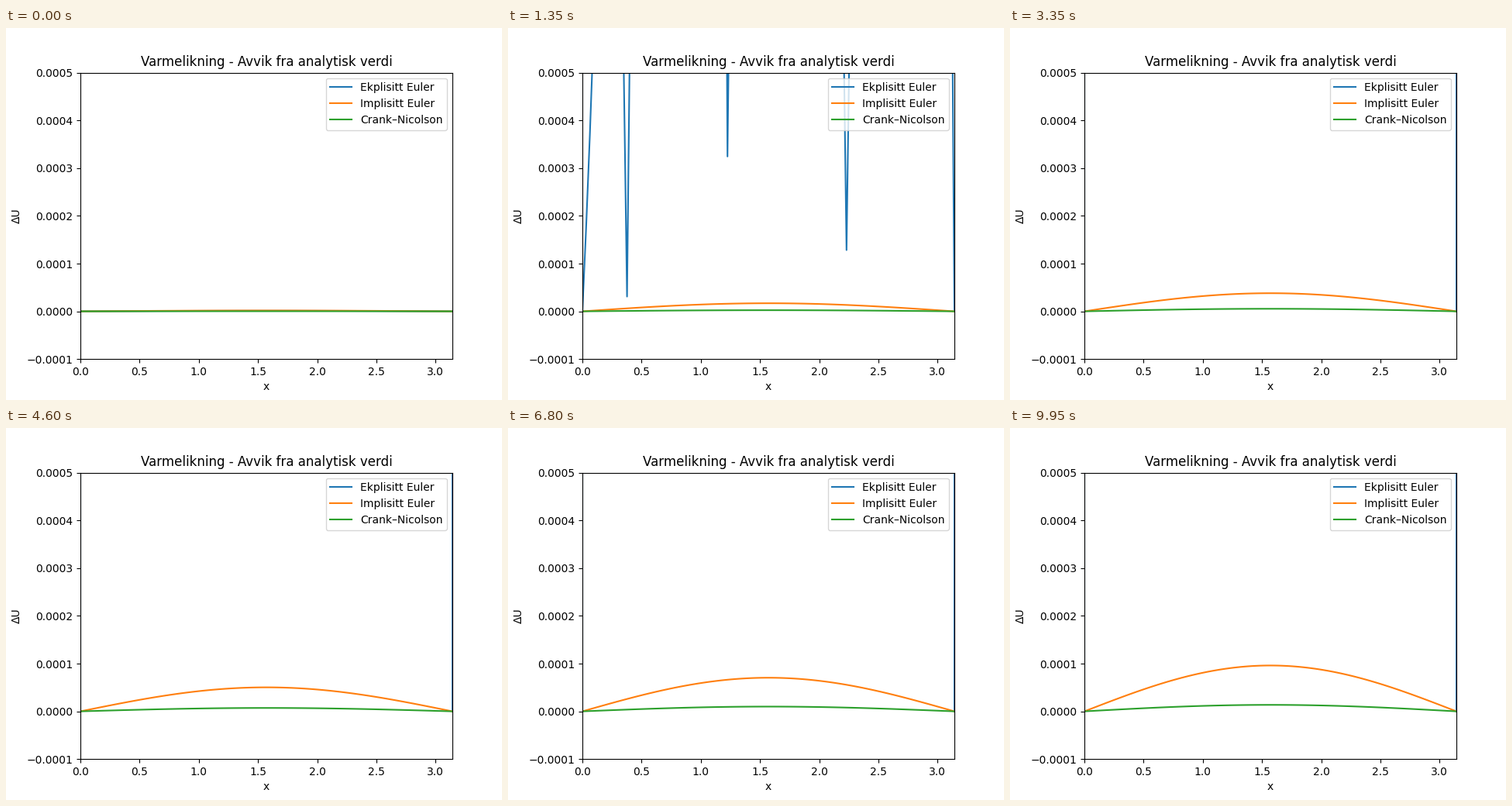
A matplotlib script for the animation above (10 s loop, 640x480 px).

```python
import numpy as np
import matplotlib.pyplot as plt
from matplotlib.animation import FuncAnimation

FRAMES = 200
INTERVAL = 50
LEAD_STEPS = 3  # time steps already taken when the loop begins

CELLS = 100
DT = 0.001
DX = np.pi / CELLS
R = DT / DX**2
x = np.linspace(0, np.pi, CELLS + 1)
start = np.sin(x)


def explicit_steps(count):
    """March the unstable explicit scheme, keeping every time level."""
    levels = [start.copy()]
    for _ in range(count):
        u = levels[-1].copy()
        u[1:-1] += R * (u[2:] - 2 * u[1:-1] + u[:-2])
        levels.append(u)
    return levels


# The stable schemes only damp the sine mode, by a fixed factor per step.
decay = 4 * R * np.sin(DX / 2) ** 2
implicit_factor = 1 / (1 + decay)
crank_factor = (1 - decay / 2) / (1 + decay / 2)
explicit = explicit_steps(FRAMES + LEAD_STEPS)


def deviations(step):
    exact = np.exp(-step * DT) * start
    solutions = (
        explicit[step],
        implicit_factor**step * start,
        crank_factor**step * start,
    )
    return [np.abs(u - exact) for u in solutions]


plt.rcParams["font.family"] = "DejaVu Sans"
fig, ax = plt.subplots(figsize=(6.4, 4.8), dpi=100)
fig.subplots_adjust(left=0.15)
ax.set_xlim(0, np.pi)
ax.set_ylim(-0.0001, 0.0005)
ax.set_title("Varmelikning - Avvik fra analytisk verdi")
ax.set_xlabel("x")
ax.set_ylabel("ΔU")

labels = ("Ekplisitt Euler", "Implisitt Euler", "Crank–Nicolson")
lines = [ax.plot(x, 0 * x, label=label)[0] for label in labels]
ax.legend(loc="upper right")


def update(frame):
    for line, values in zip(lines, deviations(frame + LEAD_STEPS)):
        line.set_ydata(values)
    return lines


anim = FuncAnimation(fig, update, frames=FRAMES, interval=INTERVAL,
                     repeat=True, repeat_delay=0)
plt.show()
```
